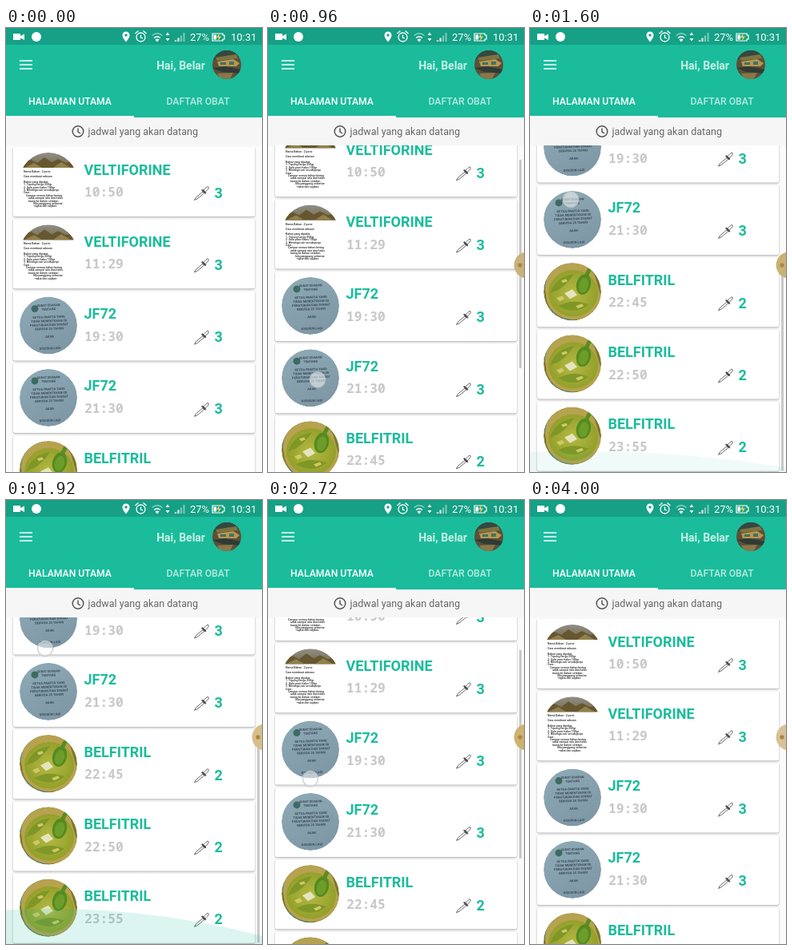
Recreate the animation shown at these times as an HTML page. Size 320 by 556 pixels, loop 4.16 s.

```html
<!DOCTYPE html>
<html lang="id">
<head>
<meta charset="utf-8">
<title>Jadwal obat</title>
<style>
  @property --y { syntax: "<number>"; inherits: true; initial-value: 490; }
  @property --x { syntax: "<number>"; inherits: true; initial-value: 71; }
  @property --base { syntax: "<number>"; inherits: true; initial-value: 465; }

  html, body { margin: 0; width: 100%; height: 100%; overflow: hidden; background: #fafafa; }
  svg { display: block; width: 100%; height: 100%; font-family: Roboto, sans-serif; }

  /* The finger position drives the list; base is the finger height at scroll 0. */
  #stage {
    --scroll: clamp(0, var(--base) - var(--y), 223);
    animation: drag 4160ms infinite, sway 4160ms linear infinite, rebase 4160ms step-end infinite;
  }
  #list { transform: translateY(calc(-1px * var(--scroll))); }
  #thumb { transform: translateY(calc(.647px * var(--scroll))); animation: thumb 4160ms linear infinite; }
  #finger {
    transform: translate(calc(1px * var(--x)), calc(1px * var(--y)));
    animation: touch 4160ms step-end infinite;
  }
  #top { transform-origin: 0 147px; animation: top 4160ms ease-out infinite; }
  #bottom { transform-origin: 0 556px; animation: bottom 4160ms ease-out infinite; }
  #bubble { animation: appear 4160ms linear infinite; }
  #bubble circle { animation: tint 4160ms linear infinite; }
  #bubble rect { transform-origin: 315px 297px; animation: turn 4160ms linear infinite; }

  /* Swipe up, rest briefly at the far end, swipe back down. */
  @keyframes drag {
    0%, 15.3846% { --y: 490; animation-timing-function: cubic-bezier(.37, 0, .63, 1); }
    44.2307%, 50% { --y: 186; animation-timing-function: cubic-bezier(.37, 0, .63, 1); }
    80.7692%, 100% { --y: 512; }
  }
  @keyframes sway {
    0%, 15.3846% { --x: 71; }
    30.7692% { --x: 53; }
    46.1538% { --x: 49; }
    65.3846% { --x: 53; }
    80.7692%, 100% { --x: 63; }
  }
  @keyframes rebase { 0% { --base: 465; } 46.1538%, 100% { --base: 409; } }
  @keyframes touch { 0% { opacity: 0; } 15.3846% { opacity: 1; } 84.6153%, 100% { opacity: 0; } }
  @keyframes thumb {
    0% { opacity: 0; animation-timing-function: step-end; }
    19.2307%, 84.6153% { opacity: 1; }
    92.3076%, 100% { opacity: 0; }
  }
  @keyframes bottom {
    0%, 36.1538% { opacity: 0; transform: scaleY(.3); }
    44.2307%, 50% { opacity: .15; transform: none; }
    60%, 100% { opacity: 0; transform: scaleY(.3); }
  }
  @keyframes top {
    0%, 69.0384% { opacity: 0; transform: scaleY(.2); }
    80.7692% { opacity: .24; transform: none; }
    92.3076%, 100% { opacity: 0; transform: scaleY(.2); }
  }
  @keyframes appear { 0%, 3.8461% { opacity: 0; } 11.5384%, 100% { opacity: 1; } }
  @keyframes tint {
    0%, 15.3846% { fill: #d9bf98; }
    30.7692% { fill: #b9a562; }
    46.1538% { fill: #d6bf88; }
    65.3846% { fill: #cfb270; }
    80.7692%, 100% { fill: #d9c199; }
  }
  @keyframes turn {
    0%, 46.1538% { transform: none; }
    65.3846%, 80.7692% { transform: rotate(45deg); }
    96.1538%, 100% { transform: rotate(90deg); }
  }

  .name, .dose { font-size: 18px; font-weight: 700; fill: #1abc9c; }
  .time { font: 600 16.3px "Noto Sans Mono", "DejaVu Sans Mono", monospace; fill: #c8c8c8; }
  .card { fill: #fff; filter: drop-shadow(0 1px 1px rgba(0, 0, 0, .32)); }
  .tab { font-size: 12.2px; font-weight: 500; fill: #fff; text-anchor: middle; }
  .tiny { font-size: 3.5px; font-weight: 500; fill: #222; }
  .letter { font-size: 4px; font-weight: 700; fill: #3a4a58; text-anchor: middle; }
</style>
</head>
<body>
<svg id="stage" viewBox="0 0 320 556">
  <defs>
    <clipPath id="view"><rect y="147" width="320" height="409"/></clipPath>
    <clipPath id="round"><circle r="36"/></clipPath>
    <clipPath id="face"><circle cx="276" cy="46" r="18"/></clipPath>
    <linearGradient id="sky" x2="0" y2="1">
      <stop stop-color="#8f8f88"/><stop offset="1" stop-color="#776b4b"/>
    </linearGradient>
    <linearGradient id="paper" x2=".5" y2="1">
      <stop stop-color="#8fabb8"/><stop offset="1" stop-color="#7f98a6"/>
    </linearGradient>
    <radialGradient id="soup">
      <stop stop-color="#b5b944"/><stop offset="1" stop-color="#93a02a"/>
    </radialGradient>

    <g id="note" clip-path="url(#round)">
      <rect x="-36" y="-36" width="72" height="72" fill="#fff"/>
      <rect x="-36" y="-36" width="72" height="19" fill="url(#sky)"/>
      <path d="M-36-17V-22L-22-27-14-23-5-30 4-24 12-28 22-23 36-27V-17Z" fill="#66572f"/>
      <path d="M-30-17L-18-23-8-17ZM6-17L16-24 28-17Z" fill="#91804c"/>
      <g id="noteText"></g>
    </g>
    <g id="sheet" clip-path="url(#round)">
      <circle r="36" fill="url(#paper)"/>
      <circle cx="-17" cy="-21" r="4.5" fill="#3d6b62"/>
      <g id="sheetText" transform="rotate(-2)"></g>
    </g>
    <g id="bowl" clip-path="url(#round)">
      <circle r="36" fill="#7c7a2a"/>
      <path d="M-36-36H-4L-18-27-29-12-36-4ZM-30 20L-16 32 4 36H-36Z" fill="#4b807a"/>
      <path d="M-33 4A33 33 0 0 1 28-20L35 4A34 31 0 0 1-33 4Z" fill="#b6a24f"/>
      <ellipse cx="1" cy="2" rx="31" ry="29" fill="url(#soup)"/>
      <path d="M-28 2Q-20-20 2-22Q-8-8-18-2ZM-18 18Q0 8 20 16Q4 30-18 18Z" fill="#7f9727"/>
      <path d="M-10 2L0-3 6 4-3 9Z" fill="#e4e5bf"/>
      <path d="M-20 8l7-3 3 4-6 3ZM4 18l8-3 2 3-7 3ZM-14-14l6-2 2 3-6 2Z" fill="#d0c864"/>
      <path d="M17-18Q20-29 29-36" fill="none" stroke="#5a8c22" stroke-width="5"/>
      <ellipse cx="14" cy="-9" rx="9" ry="13" transform="rotate(14 14 -9)" fill="#568a20"/>
      <ellipse cx="14" cy="-8" rx="6" ry="9.500" transform="rotate(14 14 -8)" fill="#6c9c2a"/>
    </g>
    <g id="dropper" fill="#fff" stroke="#444" stroke-width=".8" stroke-linejoin="round">
      <path d="M.5 18.500L2.500 15 11 8 12.500 10 4 17Z"/>
      <path d="M12 6L15 3Q17 1 18 2T17 5.500L14 8.500Z"/>
      <path d="M9.500 6L10.500 5 15 9.500 14 10.500Z" fill="#444"/>
    </g>
  </defs>

  <rect width="320" height="556" fill="#fafafa"/>
  <g clip-path="url(#view)">
    <g id="list"></g>
    <rect id="thumb" x="314" y="149" width="3" height="261" fill="#000" fill-opacity=".2"/>
    <g id="top"><circle cx="85" cy="-505" r="700" fill="#1abc9c"/></g>
    <g id="bottom"><circle cx="55" cy="1562" r="1050" fill="#1abc9c"/></g>
  </g>

  <rect y="112" width="320" height="35" fill="#f6f6f6"/>
  <g fill="none" stroke="#555" stroke-width="1.5">
    <circle cx="90" cy="129.5" r="6.8"/><path d="M90 125.5V130L93 132"/>
  </g>
  <text x="102.5" y="134" font-size="12.5" fill="#666">jadwal yang akan datang</text>

  <rect width="320" height="112" fill="#1abc9c"/>
  <rect width="320" height="21" fill="#16a085"/>
  <rect y="110" width="160" height="2" fill="#fff"/>
  <path d="M17 41H33M17 46H33M17 51H33" stroke="#fff" stroke-width="1.7"/>
  <text x="249" y="52" font-size="14" font-weight="700" text-anchor="end" fill="#c9f0e6">Hai, Belar</text>
  <g clip-path="url(#face)">
    <rect x="258" y="28" width="36" height="36" fill="#5b5039"/>
    <path d="M258 28H294V37L278 34 258 40Z" fill="#35483f"/>
    <path d="M262 37L288 33 290 38 264 41Z" fill="#7d7442"/>
    <path d="M264 42L284 39 292 44 288 48 266 48Z" fill="#b8964e"/>
    <path d="M258 50L274 48 294 52V57L270 55Z" fill="#2f3b36"/>
    <path d="M264 57L284 56 280 64H268Z" fill="#8a7648"/>
    <path d="M268 43H275V46H268ZM279 42H285V46H279Z" fill="#3e7469"/>
  </g>
  <text class="tab" x="80" y="96">HALAMAN UTAMA</text>
  <text class="tab" x="240" y="96" fill-opacity=".68">DAFTAR OBAT</text>

  <g fill="#fff">
    <path d="M9 7H18V10L23 7.500V15L18 12.500V15H9Z"/>
    <circle cx="38" cy="11" r="6"/>
    <path fill-rule="evenodd" d="M150 17.500Q145.500 12 145.500 9A4.500 4.500 0 0 1 154.500 9Q154.500 12 150 17.500ZM150 7.300A1.700 1.700 0 0 0 150 10.700A1.700 1.700 0 0 0 150 7.300Z"/>
    <path d="M189 17.500L186.500 14.500Q189 12.500 191.500 14.500ZM202 5.500L204.500 9H199.500ZM202 16.500L199.500 13H204.500Z"/>
    <path d="M211 15H213V17H211ZM214.500 12.500H216.500V17H214.500Z"/>
    <path d="M218 9.500H220V17H218ZM221.500 6H223.500V17H221.500Z" opacity=".45"/>
    <g font-size="13"><text x="230" y="15.500">27%</text><text x="281" y="15.500">10:31</text></g>
    <path d="M258 7H271V9H273V14H271V16H258Z" fill="none" stroke="#fff" stroke-width="1.200"/>
    <path d="M259.500 8.500H263V14.500H259.500Z"/>
    <path d="M267 6L263 12H266L264.500 17 269 10.500H266Z" fill="#f4d35e"/>
  </g>
  <g fill="none" stroke="#fff" stroke-width="1.300">
    <circle cx="168.500" cy="11.500" r="5.500"/>
    <path d="M168.500 8.500V12L171 13M161.500 7L165.500 3.500M175.500 7L171.500 3.500"/>
    <path d="M185 12.500Q189 9 193 12.500"/>
    <path d="M182.500 9.500Q189 4 195.500 9.500" opacity=".5"/>
  </g>

  <g id="bubble">
    <circle cx="324" cy="297" r="16.500"/>
    <rect x="312.500" y="294.500" width="5" height="5" rx="1.500" fill="#a98742"/>
  </g>
  <circle id="finger" r="9.500" fill="#fff" fill-opacity=".5" stroke="#c6cacc" stroke-opacity=".85" stroke-width="1.500"/>
</svg>

<script>
  const fill = (id, html) => { document.getElementById(id).innerHTML = html; };

  const cards = [
    ["VELTIFORINE", "10:50", 3, "note"],
    ["VELTIFORINE", "11:29", 3, "note"],
    ["JF72", "19:30", 3, "sheet"],
    ["JF72", "21:30", 3, "sheet"],
    ["BELFITRIL", "22:45", 2, "bowl"],
    ["BELFITRIL", "22:50", 2, "bowl"],
    ["BELFITRIL", "23:55", 2, "bowl"],
  ];
  fill("list", cards.map(([name, time, dose, photo], i) => `
    <g transform="translate(0 ${149 + i * 90.3})">
      <rect class="card" x="9" width="302" height="87" rx="2.5"/>
      <use href="#${photo}" x="53" y="43"/>
      <text class="name" x="97.500" y="34.500">${name}</text>
      <text class="time" x="98" y="62">${time}</text>
      <use href="#dropper" x="235" y="48"/>
      <text class="dose" x="260.500" y="63.500">${dose}</text>
    </g>`).join(""));

  const notes = [
    [0, "Cara membuat adonan"], [0, ""], [0, "Bahan yang dipakai"], [0, "1. Tepung terigu 250gr"],
    [0, "2. Gula pasir halus 100gr"], [0, "3. Mentega cair secukupnya"], [0, "Cara :"],
    [3, "Campur semua bahan kering"], [6, "aduk sampai rata dan halus"], [6, "tuang ke dalam cetakan"],
    [12, "lalu panggang sebentar"], [12, "angkat dan sajikan"],
  ];
  fill("noteText", `<text class="tiny" x="-31" y="-11" font-weight="700">Nama Bahan : 2 porsi</text>` +
    notes.map(([dx, s], i) => `<text class="tiny" x="${dx - 31}" y="${-5 + i * 3.4}">${s}</text>`).join(""));

  const letter = ["SURAT EDARAN", "TENTANG", "", "KETUA PANITIA YANG", "TIDAK MENENTUKAN ISI",
    "PERATURAN DAN SYARAT", "BERUSIA 25 TAHUN", "", "AKAN", "", "", "DISUSUN LAGI"];
  fill("sheetText", letter.map((s, i) =>
    `<text class="letter" x="1" y="${-24 + i * 4.9}">${s}</text>`).join(""));

  const loop = 4160, hold = 160;
  const motions = document.getAnimations();
  motions.forEach(m => m.pause());
  const start = performance.now();
  function draw() {
    const t = (performance.now() - start) % loop;
    motions.forEach(m => { m.currentTime = Math.floor(t / hold) * hold; });
    requestAnimationFrame(draw);
  }
  draw();
</script>
</body>
</html>
```
